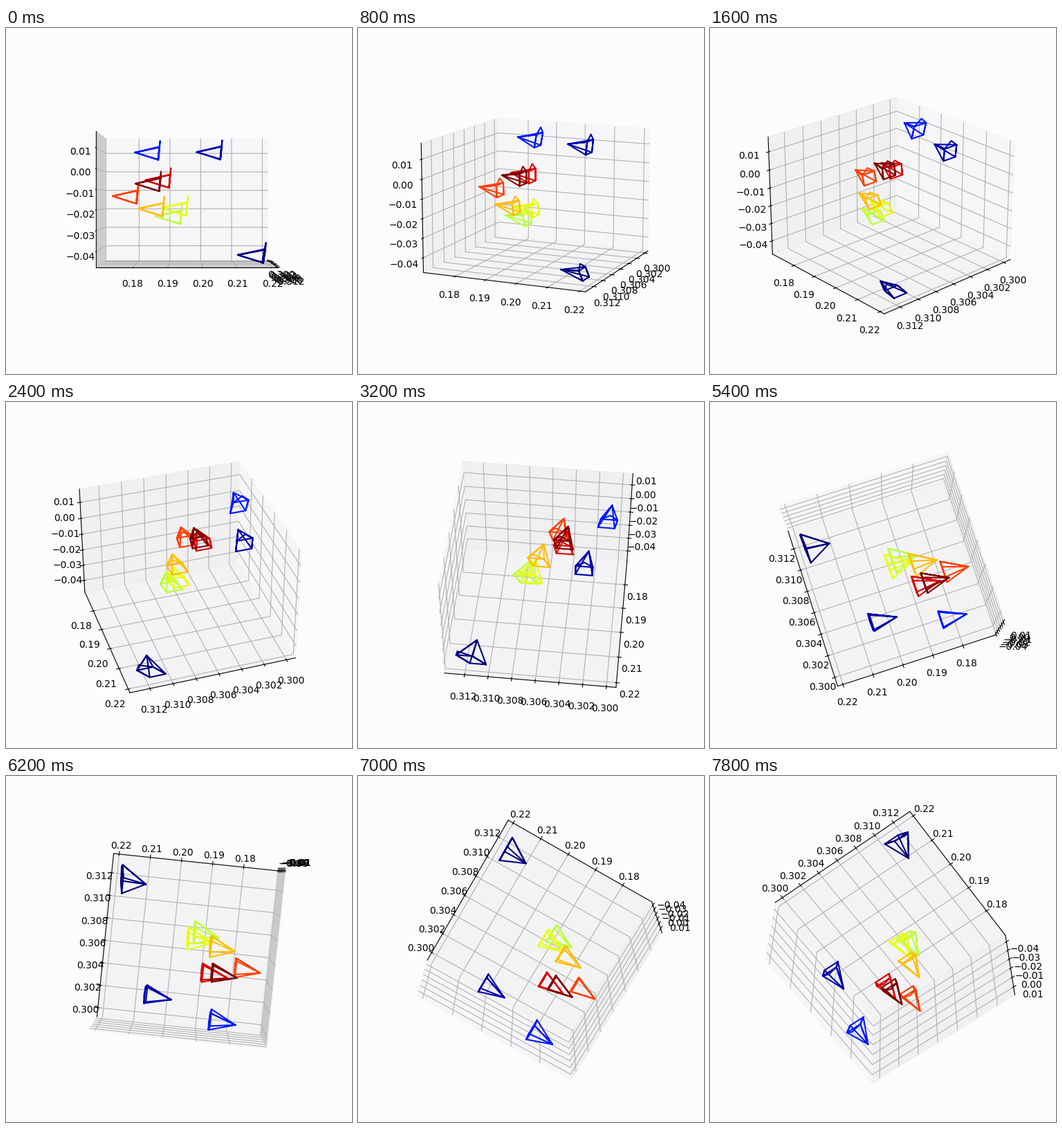
Recreate the animation shown at these times as a matplotlib script. Size 500 px wide and 500 px high, loop 8 s.

```python
import numpy as np
import matplotlib.pyplot as plt
from matplotlib.animation import FuncAnimation

FRAMES = 40
PAPER = "#fcfcff"

# Axis limits, and half the size of the 4:4:3 box they span
LOW = np.array([0.29919, 0.16924, -0.0476])
HIGH = np.array([0.31371, 0.22178, 0.0181])
HALF = 0.14883 * np.array([4, 4, 3])

# Camera apexes in box units, each with its place on the jet colour scale
CAMERAS = [
    (0.400, 0.339, -0.372, 0.00),
    (-0.345, 0.071, 0.338, 0.04),
    (-0.470, -0.377, 0.339, 0.15),
    (0.083, -0.216, -0.118, 0.58),
    (0.041, -0.175, -0.061, 0.63),
    (0.000, -0.338, -0.066, 0.71),
    (-0.125, -0.523, 0.021, 0.84),
    (-0.175, -0.295, 0.133, 0.92),
    (-0.170, -0.364, 0.109, 1.00),
]

# One stroke over every edge: 0 apex, 1-4 image corners, 5 "up" peak
STROKE = [0, 1, 2, 0, 3, 2, 3, 4, 1, 4, 0, 4, 5, 3]


def to_data(box):
    return LOW + (box / HALF + 1) / 2 * (HIGH - LOW)


def camera_path(apex):
    """Pyramid opening along +y, rolled further the larger its x."""
    roll = 0.45 + 1.35 * apex[0]

    def corner(side, height):
        depth = 0.173 + 0.1 * height
        return 0.018 + side + roll * height, depth, height - 0.007

    wide, tall = 0.057, 0.046
    points = [(0, 0, 0),
              corner(wide, -tall), corner(-wide, -tall),
              corner(-wide, tall), corner(wide, tall),
              corner(0, 2 * tall)]
    return to_data(np.array(points) + apex)[STROKE].T


fig = plt.figure(figsize=(5, 5), dpi=100, facecolor=PAPER)
ax = fig.add_subplot(projection="3d")
ax.set_facecolor(PAPER)

for *apex, shade in CAMERAS:
    ax.plot(*camera_path(apex), color=plt.cm.jet(shade), lw=1.5)

ax.set(xlim=(LOW[0], HIGH[0]), ylim=(LOW[1], HIGH[1]), zlim=(LOW[2], HIGH[2]),
       xticks=np.arange(300, 313, 2) / 1000,
       yticks=np.arange(18, 23) / 100,
       zticks=np.arange(-4, 2) / 100)


def draw(i):
    ax.view_init(elev=3 * i, azim=6 * i)
    return []


anim = FuncAnimation(fig, draw, frames=FRAMES, interval=200,
                     repeat=True, repeat_delay=0, blit=False)
plt.show()
```
